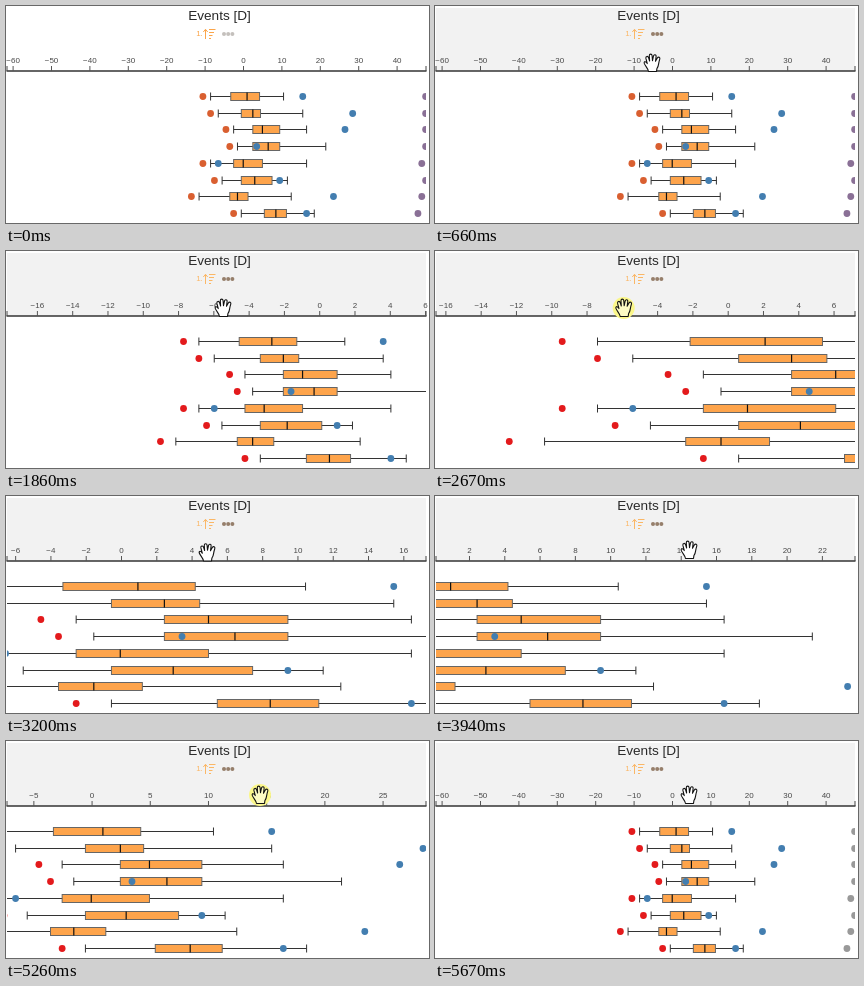
An HTML page with a canvas that plays this animation: 423 by 217 pixels, repeating every 7460 ms.

```html
<!DOCTYPE html>
<html lang="en">
<head>
<meta charset="utf-8">
<title>Zoomable box plots</title>
<style>
  html, body { margin: 0; width: 100%; height: 100%; overflow: hidden; background: #fff; }
  canvas { display: block; width: 423px; height: 217px; }
</style>
</head>
<body>
<canvas id="stage"></canvas>
<script>
const LOOP = 7460, TICK = 66.8;
const ENTER = 2, TOOLTIP = 65, DOUBLE_CLICK = 79, RESET = 85, REDRAW_LAG = 3;
const LEFT = 1, RIGHT = 420, AXIS_Y = 65;
const ARIAL = '"Liberation Sans", Arial, sans-serif';
const HUMANIST = '"Open Sans", sans-serif';
const canvas = document.getElementById('stage');
const ctx = canvas.getContext('2d');
const ratio = window.devicePixelRatio || 1;
canvas.width = 423 * ratio;
canvas.height = 217 * ratio;

// whisker, quartile, median, quartile, whisker, high dot
const rows = [
  [-8.5, -3.25, 1, 4.25, 10.5, 15.5],
  [-6.5, -0.5, 2.5, 4.5, 15.5, 28.5],
  [-2.5, 2.5, 5, 9.5, 16.5, 26.5],
  [-1.5, 2.5, 6.5, 9.5, 21.5, 3.5],
  [-8.5, -2.5, 0, 5, 16.5, -6.5],
  [-5.5, -0.5, 3, 7.5, 11.5, 9.5],
  [-11.5, -3.5, -1.5, 1.25, 12.5, 23.5],
  [-0.5, 5.5, 8.5, 11.25, 18.5, 16.5]
];

// Wheel zooms have notches; the others drag along with the pointer
const gestures = [
  { from: 15, to: 19, center: 216.3, notches: 5 },
  { from: 25, to: 28, center: 216.3, notches: 6 },
  { from: 39, to: 43 },
  { from: 52, to: 56 },
  { from: 64, to: 65, center: 254.5, notches: -3 }
];

// tick and x of each turning point of the pointer
const pointerStops = [
  [ENTER, 224], [10, 217], [34, 217], [39, 209.2], [43, 11],
  [47, 201], [49, 201], [52, 246], [56, 129.7], [59, 254]
];

const clamp = (v, lo, hi) => Math.min(hi, Math.max(lo, v));
const progress = (tick, from, to) => clamp((tick - from) / (to - from), 0, 1);
const ease = u => u ** 3 * (10 - 15 * u + 6 * u * u);

function pointerAt(tick) {
  let x = pointerStops[0][1];
  for (let i = 1; i < pointerStops.length; i++) {
    const [t0, x0] = pointerStops[i - 1], [t1, x1] = pointerStops[i];
    x += (x1 - x0) * ease(progress(tick, t0, t1));
  }
  return { x, y: 69 - 12 * progress(tick, ENTER, 10) - 3 * progress(tick, 46, 59) };
}

function viewAt(tick) {
  const view = { zero: 237.5, scale: 3.84 };
  if (tick >= RESET) return view;
  for (const { from, to, center, notches } of gestures) {
    if (notches) {
      const factor = 2 ** (notches / 5 * progress(tick, from - 1, to));
      view.scale *= factor;
      view.zero = center + (view.zero - center) * factor;
    } else {
      view.zero += pointerAt(clamp(tick, from, to)).x - pointerAt(from).x;
    }
  }
  return view;
}

// The plots follow the axis only once a gesture has settled
function lastRedraw(tick) {
  if (tick >= RESET) return RESET;
  const settled = gestures.map(g => g.to + REDRAW_LAG).filter(t => t <= tick);
  return Math.max(0, ...settled);
}

function tickStep(span) {
  const raw = span / 10, power = 10 ** Math.floor(Math.log10(raw)), rest = raw / power;
  return power * (rest >= Math.sqrt(50) ? 10 : rest >= Math.sqrt(10) ? 5 : rest >= Math.SQRT2 ? 2 : 1);
}

function line(x1, y1, x2, y2, color = '#333', width = 1) {
  ctx.strokeStyle = color;
  ctx.lineWidth = width;
  ctx.beginPath();
  ctx.moveTo(x1, y1);
  ctx.lineTo(x2, y2);
  ctx.stroke();
}

function dot(x, y, r, color) {
  ctx.fillStyle = color;
  ctx.beginPath();
  ctx.arc(x, y, r, 0, 2 * Math.PI);
  ctx.fill();
}

function text(str, x, y, size, color, family = ARIAL) {
  ctx.font = `${size}px ${family}`;
  ctx.fillStyle = color;
  ctx.textAlign = 'center';
  ctx.fillText(str, x, y);
}

function drawHeader(hover) {
  if (hover) {
    ctx.fillStyle = '#f2f2f2';
    ctx.fillRect(LEFT, 2, RIGHT - LEFT, AXIS_Y - 2);
  }
  text('Events [D]', 213.5, 14, 13.6, '#2a2a2a');
  const orange = hover ? '#fbb766' : '#fba54a';
  text('1.', 193.5, 30, 8, orange);
  line(199.5, 23.5, 199.5, 33, orange);
  for (const side of [-2.2, 2.2]) line(199.5 + side, 26, 199.5, 23.3, orange);
  for (let i = 0; i < 4; i++) line(203, 23.5 + 3 * i, 209.5 - 1.5 * i, 23.5 + 3 * i, orange);
  for (let i = 0; i < 3; i++) dot(218 + 4.2 * i, 28, 2, hover ? '#967f6b' : '#c4c0bc');
}

function drawAxis({ zero, scale }) {
  line(LEFT - 0.5, AXIS_Y, RIGHT + 0.5, AXIS_Y, '#333', 1.4);
  for (const x of [LEFT, RIGHT]) line(x, 60, x, AXIS_Y, '#444');
  const step = tickStep((RIGHT - LEFT) / scale);
  for (let v = Math.ceil((LEFT - zero) / scale / step) * step; ; v += step) {
    const x = zero + v * scale;
    if (x > RIGHT) break;
    line(x, 60, x, AXIS_Y, '#555');
    text((v < 0 ? '\u2212' : '') + Math.abs(v), x, 57, 8, '#484848');
  }
}

function drawPlots({ zero, scale }, vivid) {
  ctx.save();
  ctx.beginPath();
  ctx.rect(LEFT, AXIS_Y + 2, RIGHT - LEFT, 150);
  ctx.clip();
  const toX = v => zero + (v - 0.07) * scale;
  rows.forEach((row, i) => {
    const y = Math.floor(90.4 + 16.75 * i) + 0.5;
    const [min, q1, median, q3, max, high] = row.map(toX);
    const low = toX(row[0] - 2);
    const far = toX(47.5 - (i < 4 ? 0 : Math.abs(i - 5)));
    line(min, y, max, y);
    for (const x of [min, max]) line(x, y - 4, x, y + 4);
    ctx.fillStyle = '#fea44b';
    ctx.fillRect(q1, y - 4, q3 - q1, 8);
    ctx.strokeStyle = '#666';
    ctx.strokeRect(q1, y - 4, q3 - q1, 8);
    line(median, y - 4, median, y + 4, '#111', 1.2);
    dot(low, y, 3.4, vivid ? '#e31a1c' : '#d95f30');
    dot(high, y, 3.4, '#437eb0');
    dot(far, y, 3.4, vivid ? '#999' : '#8a7096');
  });
  ctx.restore();
}

const hand = new Path2D(
  'M-4 8.5C-4.5 5-7.5 3-8.3.2C-8.6-1.8-6.5-2-5.2.6L-6.6-4.6C-7-6.8-4.6-7.4-3.9-5.2L-2.9-2' +
  'L-3.2-7.2C-3.2-9.4-.6-9.4-.4-7.2L0-2.4L1-7C1.5-9 4-8.5 3.6-6.4L3-1.8L4.8-5' +
  'C5.9-6.8 8-5.6 7.2-3.6C5.6.4 6.6 3 4.4 5.6L4 8.5Z');

function drawPointer({ x, y }, pressed) {
  if (pressed) dot(x, y, 11, '#fbf78a');
  ctx.save();
  ctx.translate(x + 0.5, y);
  ctx.fillStyle = pressed ? '#fdfbc4' : '#fff';
  ctx.fill(hand);
  ctx.strokeStyle = '#111';
  ctx.lineWidth = 1.1;
  ctx.lineJoin = 'round';
  ctx.stroke(hand);
  ctx.restore();
}

function drawTooltip() {
  ctx.fillStyle = '#4a4a4a';
  ctx.fillRect(266, 71, 67, 23);
  text('Events [D]', 299.8, 87, 11.4, '#fff', HUMANIST);
}

function isPressed(tick) {
  const sinceClick = tick - DOUBLE_CLICK;
  return sinceClick === 0 || sinceClick === 2 ||
    gestures.some(g => !g.notches && tick >= g.from && tick <= g.to);
}

function draw(ms) {
  const tick = Math.floor((ms + 17) / TICK);
  const pointer = pointerAt(tick);
  const redraw = lastRedraw(tick);

  ctx.setTransform(ratio, 0, 0, ratio, 0, 0);
  ctx.fillStyle = '#fff';
  ctx.fillRect(0, 0, 423, 217);
  drawHeader(tick >= ENTER && pointer.y < AXIS_Y);
  drawAxis(viewAt(tick));
  drawPlots(viewAt(redraw), redraw > 0);
  if (tick >= TOOLTIP && tick < DOUBLE_CLICK) drawTooltip();
  if (tick >= ENTER) drawPointer(pointer, isPressed(tick));
}

const start = performance.now();
function play() {
  draw((performance.now() - start) % LOOP);
  requestAnimationFrame(play);
}
play();
</script>
</body>
</html>
```
